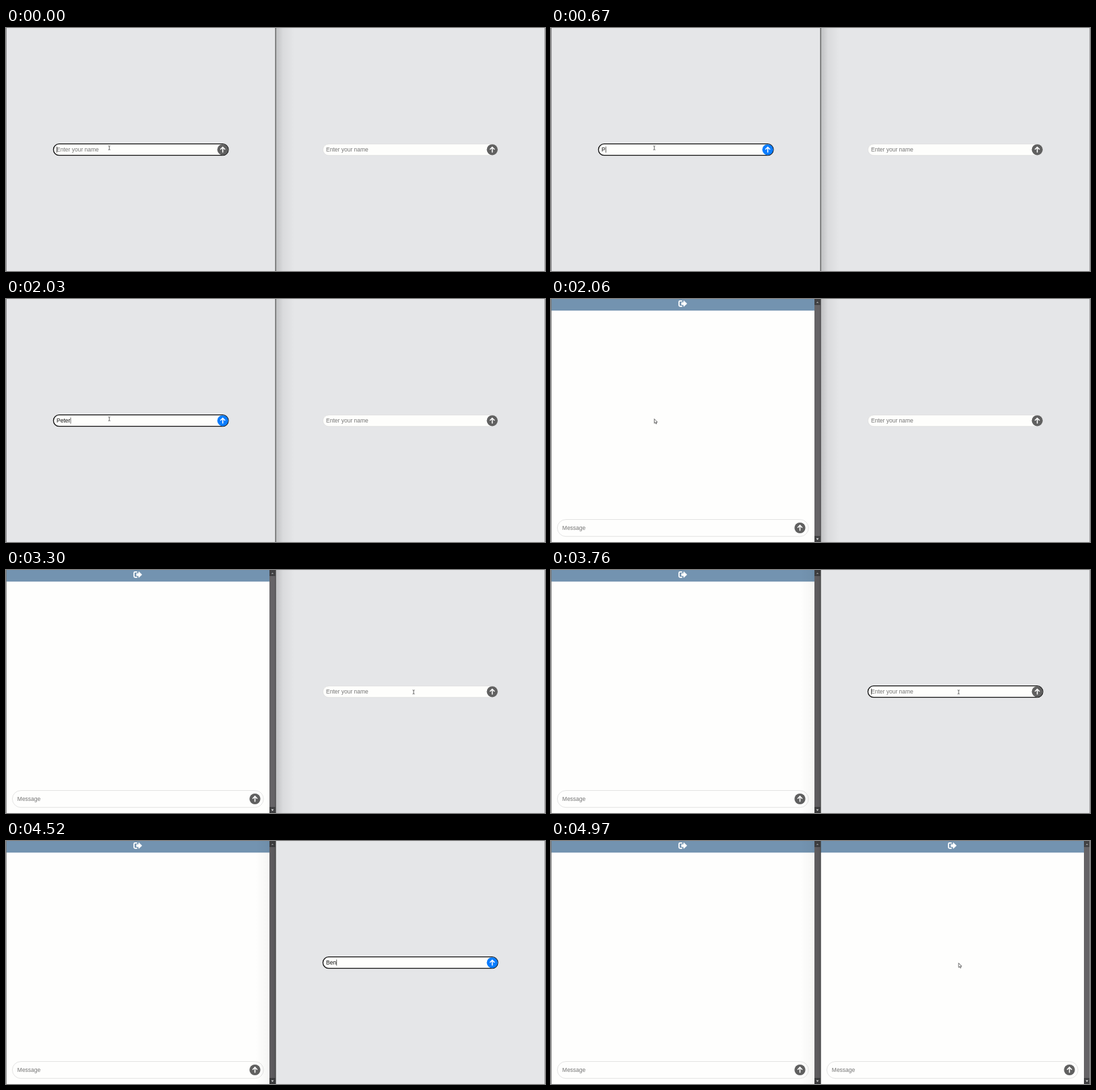
Animation of 800x362 px, one loop 5 s. Source, as an HTML page:

```html
<!DOCTYPE html>
<html lang="en">
<head>
<meta charset="utf-8">
<title>Chat sign-in</title>
<style>
  html, body { margin: 0; width: 100%; height: 100%; overflow: hidden; background: #e5e6e8; }
  svg { display: block; width: 100%; height: 100%; }
  text { font: 8.5px "Liberation Sans", Arial, sans-serif; white-space: pre; }
</style>
</head>
<body>
<svg id="stage" viewBox="0 0 800 362">
  <defs>
    <linearGradient id="toRight">
      <stop offset="0" stop-opacity=".17"/>
      <stop offset=".4" stop-opacity=".05"/>
      <stop offset="1" stop-opacity="0"/>
    </linearGradient>
    <linearGradient id="toLeft">
      <stop offset="0" stop-opacity="0"/>
      <stop offset=".6" stop-opacity=".03"/>
      <stop offset="1" stop-opacity=".13"/>
    </linearGradient>
  </defs>
  <g id="scene"></g>
</svg>
<script>
const LOOP = 5000;
const FOCUS_RIGHT = 3480;
const users = [
  { x: 0, name: "Peter", keys: [650, 790, 930, 1070, 1210], submit: 2060 },
  { x: 400, name: "Ben", keys: [3900, 4070, 4250], submit: 4880 }
];
const scene = document.getElementById("scene");
const pen = document.createElement("canvas").getContext("2d");
pen.font = '85px "Liberation Sans", Arial, sans-serif';
const textWidth = s => pen.measureText(s).width / 10;

const rect = (x, y, w, h, fill, more = "") =>
  `<rect x="${x}" y="${y}" width="${w}" height="${h}" fill="${fill}" ${more}/>`;

const label = (x, y, s, fill) => `<text x="${x}" y="${y}" fill="${fill}">${s}</text>`;

const sendButton = (x, y, fill) =>
  `<g transform="translate(${x} ${y})"><circle r="8.1" fill="${fill}"/>
   <path d="M0 4.2V-3.6M-3.5 -.2L0 -3.8L3.5 -.2" fill="none" stroke="#fff" stroke-width="1.5"/></g>`;

function signIn(typed, focused) {
  const border = focused ? 'stroke="#111" stroke-width="1.3"' : 'stroke="#d8d8d8" stroke-width=".6"';
  const field = focused ? rect(70.4, 172.7, 259.6, 17, "#fefefc", `rx="8.5" ${border}`)
                        : rect(70.5, 172.9, 259, 16.8, "#fefefc", `rx="8.4" ${border}`);
  const caret = focused ? rect(75.3 + textWidth(typed), 176.6, .7, 9, "#222") : "";
  return rect(0, 0, 400, 362, "#e5e6e8") + field +
    label(75, 184.1, typed || "Enter your name", typed ? "#111" : "#757575") + caret +
    sendButton(321.7, 181.3, typed ? "#0a7cff" : "#606060");
}

function chat() {
  return rect(0, 0, 400, 362, "#fefefd") + rect(0, 0, 391, 17.3, "#7393b0") +
    `<path d="M194 2.9H191.6Q190 2.9 190 4.5V9.3Q190 10.9 191.6 10.9H194" fill="none" stroke="#fff" stroke-width="1.7" stroke-linecap="round"/>
     <path d="M193.8 5.2H197V2.6L201.6 6.9L197 11.2V8.6H193.8Z" fill="#fff" stroke="#fff" stroke-width=".8" stroke-linejoin="round"/>` +
    rect(9.4, 328.5, 372.8, 25.2, "#fefefd", 'rx="12.6" stroke="#d9d9d9" stroke-width=".7"') +
    label(16.8, 344.2, "Message", "#757575") + sendButton(369.5, 341, "#606060") +
    rect(391, 0, 9, 362, "#656366") + rect(391, 0, 9, 9, "#414143") + rect(391, 353, 9, 9, "#414143") +
    `<path d="M393.8 6L395.5 3.8L397.2 6Z" fill="#999"/><path d="M393.6 356.4L395.5 359L397.4 356.4Z" fill="#eee"/>`;
}

const bezier = (a, b, c, d, p) => {
  const q = 1 - p;
  return a * q * q * q + 3 * b * p * q * q + 3 * c * p * p * q + d * p * p * p;
};

function pointer(t) {
  if (t >= users[1].keys[0] && t < users[1].submit) return "";
  const p = Math.min(1, Math.max(0, (t - 2730) / 510));
  const e = p * p * (3 - 2 * p);
  const x = bezier(153.3, 350, 815, 605, e), y = bezier(178.6, 243, 243, 181.8, e);
  const user = users[x < 400 ? 0 : 1], lx = x - user.x;
  const overField = t < user.submit && lx > 70 && lx < 313 && y > 172 && y < 190;
  const shape = overField
    ? '<path d="M-1.5 -3Q0 -3 0 -2V2Q0 3 -1.5 3M1.5 -3Q0 -3 0 -2M0 2Q0 3 1.5 3" fill="none" stroke="#444" stroke-width=".8"/>'
    : '<path d="M0 0V6.6L1.5 5.2L2.5 7.5L3.6 7L2.6 4.8H4.6Z" fill="#fff" stroke="#333" stroke-width=".7"/>';
  return `<g transform="translate(${x.toFixed(2)} ${y.toFixed(2)})">${shape}</g>`;
}

function draw(t) {
  const front = t < FOCUS_RIGHT ? 0 : 1;
  const pages = users.map((u, i) => {
    const typed = u.name.slice(0, u.keys.filter(k => t >= k).length);
    return `<g transform="translate(${u.x})">${t < u.submit ? signIn(typed, front === i) : chat()}</g>`;
  });
  const shadow = front ? rect(370, 0, 30, 362, "url(#toLeft)") : rect(400, 0, 28, 362, "url(#toRight)");
  return pages.join("") + shadow +
    rect(0, 0, .8, 362, "#777") + rect(399.6, 0, 1.1, 362, "#444") + rect(799.2, 0, .8, 362, "#999") +
    pointer(t);
}

let last = "";
function frame(now) {
  const html = draw(now % LOOP);
  if (html !== last) scene.innerHTML = last = html;
  requestAnimationFrame(frame);
}
frame(0);
</script>
</body>
</html>
```
